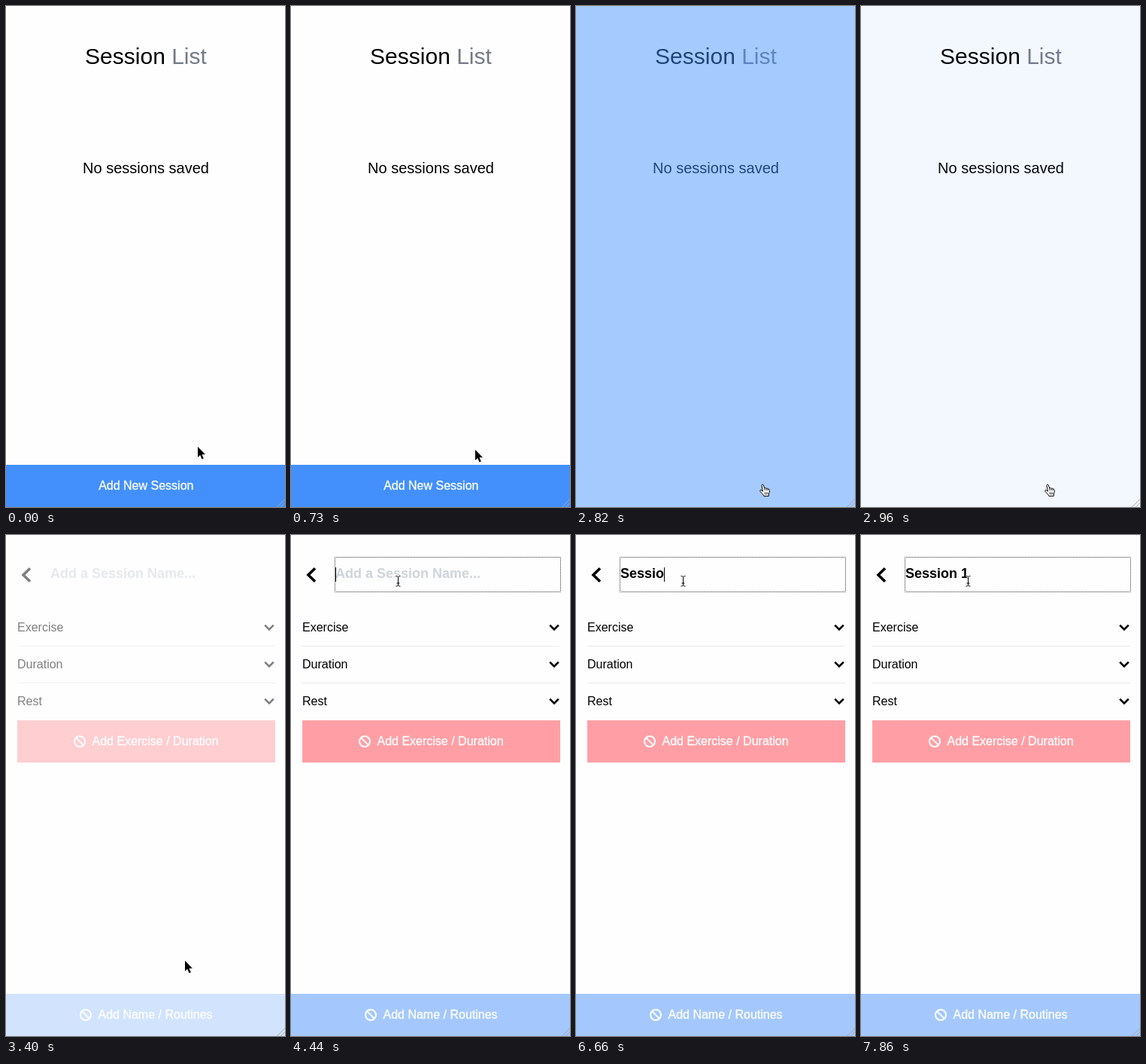
An HTML page that plays this animation: 371 px wide and 665 px high, repeating every 8000 ms.

```html
<!DOCTYPE html>
<html lang="en">
<head>
<meta charset="utf-8">
<title>Session list</title>
<style>
html, body { margin: 0; width: 100%; height: 100%; overflow: hidden; background: #fefefe; }
body { position: relative; font: 16px "Liberation Sans", Arial, sans-serif; }
svg { position: absolute; left: 0; top: 0; width: 371px; height: 665px; display: block; }
.mid { text-anchor: middle; }
.light { fill: #fff; stroke: #fff; stroke-width: .3px; }
.icon { fill: none; stroke: #fff; stroke-width: 2; }
.chevron { fill: none; stroke: #000; stroke-width: 2.6; }
.bold { font-weight: bold; font-size: 18px; }

/* every change is a hard step on one shared 8 s clock */
.list, .cta, .flash, .form, .focus, .hint, .typed::before, .caret,
.cursor, .arrow, .hand, .beam { animation: 8s step-end infinite; }

.list { animation-name: list; }
.cta { animation-name: cta; }
.flash { animation-name: flash; }
.form { animation-name: form; }
.focus { animation-name: focus; }
.hint { animation-name: hint; }
.caret { animation-name: caret; }
.cursor { animation-name: move; }
.arrow { animation-name: arrow; }
.hand { animation-name: hand; }
.beam { animation-name: beam; }

.field { position: absolute; left: 59px; top: 41px; line-height: 20px; white-space: pre; color: #000; }
.typed::before { content: ""; animation-name: type; }
.caret { display: inline-block; position: relative; width: 0; height: 0; }
.caret::after { content: ""; position: absolute; left: 0; top: -14px; width: 1px; height: 19px; background: #000; }

@keyframes list { 0% { opacity: 1 } 38.875% { opacity: .45 } 40.75%, 100% { opacity: 0 } }
@keyframes cta { 0% { opacity: 1 } 35.25%, 100% { opacity: 0 } }
@keyframes flash { 0% { opacity: 0 } 35.25% { opacity: .48 } 37% { opacity: .055 } 38.875%, 100% { opacity: 0 } }
@keyframes form { 0% { opacity: 0 } 40.75% { opacity: .5 } 42.625%, 100% { opacity: 1 } }
@keyframes focus { 0% { opacity: 0 } 55.5%, 100% { opacity: 1 } }
@keyframes hint { 0% { opacity: 1 } 72.25%, 100% { opacity: 0 } }
@keyframes caret {
  0% { opacity: 0 } 55.5% { opacity: 1 } 62.875% { opacity: 0 } 70.375% { opacity: 1 }
  90.75% { opacity: 0 } 94.5% { opacity: 1 } 98.25%, 100% { opacity: 0 }
}
@keyframes type {
  0% { content: "" } 72.25% { content: "S" } 76% { content: "Se" } 77.75% { content: "Ses" }
  79.625% { content: "Sess" } 81.5% { content: "Sessi" } 83.25% { content: "Sessio" }
  85.125% { content: "Session" } 94.5%, 100% { content: "Session 1" }
}
@keyframes move {
  0% { transform: translate(255px, 585px) }
  1.75% { transform: translate(251px, 578px) }
  3.625% { transform: translate(246px, 571px) }
  5.5% { transform: translate(243px, 569px) }
  7.25% { transform: translate(243px, 575px) }
  9.125% { transform: translate(245px, 589px) }
  11% { transform: translate(248px, 606px) }
  12.875% { transform: translate(250px, 622px) }
  14.625% { transform: translate(251px, 632px) }
  16.5% { transform: translate(250px, 634px) }
  20.25% { transform: translate(248px, 635px) }
  38.875% { transform: translate(246px, 622px) }
  40.75% { transform: translate(238px, 565px) }
  42.625% { transform: translate(222px, 440px) }
  44.375% { transform: translate(200px, 280px) }
  46.25% { transform: translate(176px, 145px) }
  48.125% { transform: translate(157px, 69px) }
  50% { transform: translate(147px, 63px) }
  51.75%, 100% { transform: translate(142px, 61px) }
}
@keyframes arrow { 0% { opacity: 1 } 12.875% { opacity: 0 } 38.875% { opacity: 1 } 48.125%, 100% { opacity: 0 } }
@keyframes hand { 0% { opacity: 0 } 12.875% { opacity: 1 } 38.875%, 100% { opacity: 0 } }
@keyframes beam { 0% { opacity: 0 } 48.125%, 100% { opacity: 1 } }
</style>
</head>
<body>
<svg viewBox="0 0 371 665">
  <defs>
    <path id="down" class="chevron" d="M344.2 119.7l5.8 5.8 5.8-5.8"/>
    <g id="ban" class="icon"><circle r="7"/><path d="M-4.9-4.9L4.9 4.9"/></g>
  </defs>

  <g class="list">
    <text class="mid" x="186" y="77" font-size="30">Session <tspan fill="#757a87">List</tspan></text>
    <text class="mid" x="186" y="222" font-size="20">No sessions saved</text>
    <g class="cta">
      <rect y="609" width="371" height="56" fill="#4390fc"/>
      <text class="mid light" x="186.3" y="642">Add New Session</text>
    </g>
  </g>
  <rect class="flash" width="371" height="665" fill="#4390fc"/>

  <g class="form">
    <path class="chevron" d="M32 44.2L23 53l9 8.8" style="stroke-width:3.6"/>
    <text class="hint bold" x="59" y="57" fill="#cfd4db">Add a Session Name...</text>
    <rect class="focus" x="58.5" y="29.5" width="300" height="46" fill="none" stroke="#333" stroke-dasharray="1 1" stroke-dashoffset=".5"/>
    <text x="15" y="128">Exercise</text>
    <text x="15" y="177">Duration</text>
    <text x="15" y="226">Rest</text>
    <use href="#down"/>
    <use href="#down" y="49"/>
    <use href="#down" y="98"/>
    <path d="M15 147.5H358M15 196.5H358" stroke="#e8e9eb"/>
    <rect x="15" y="246" width="343" height="56" fill="#ff9fa5"/>
    <use href="#ban" x="98" y="274"/>
    <text class="light" x="114.5" y="279">Add Exercise / Duration</text>
    <rect y="609" width="371" height="56" fill="#a4c8fd"/>
    <use href="#ban" x="106" y="637"/>
    <text class="light" x="122.5" y="642">Add Name / Routines</text>
  </g>
  <path d="M360.5 665L371 654.5M365.5 665l5.5-5.5" stroke="#a5a7ab" fill="none"/>
</svg>

<div class="field bold"><span class="typed"></span><span class="caret"></span></div>

<svg viewBox="0 0 371 665">
  <g class="cursor" stroke-linejoin="round">
    <path class="arrow" d="M0 0V14L3.2 11 5.5 16.4 7.8 15.4 5.5 10.2H10Z" stroke="#fff" stroke-width="1.6" paint-order="stroke"/>
    <g class="hand" transform="translate(-5 -1)" stroke="#000" fill="none">
      <path id="palm" d="M4 2.6C3.6.9 5.8.5 6.3 2L7.6 6.3C8 5.2 9.6 5.4 9.9 6.6 10.4 5.8 11.8 6 12 7.2 12.8 6.6 14 7.2 14.1 8.3 14.4 10.5 14.4 12 13.4 13.8L13.2 16.5H6.8C6.3 14.5 4 12.8 2.4 10.8.9 8.9 2.4 7.8 3.8 8.9L5.4 10.2Z" fill="#fff"/>
      <path d="M7.6 6.3L8.2 9M9.9 6.6L10.3 9M12 7.2L12.2 9.2M8.3 11.5V14.5M10.2 11.5V14.5M12 11.5V14.5" stroke-width=".8"/>
    </g>
    <g class="beam" fill="none">
      <path id="stem" d="M-2.5-6.5C-.5-6.5.5-6 .5-4.8V5.2C.5 6.5-.5 7-2.5 7M3.5-6.5C1.5-6.5.5-6 .5-4.8M.5 5.2C.5 6.5 1.5 7 3.5 7M-1.5 3H2.5" stroke="#fff" stroke-width="2.6"/>
      <path d="M-2.5-6.5C-.5-6.5.5-6 .5-4.8V5.2C.5 6.5-.5 7-2.5 7M3.5-6.5C1.5-6.5.5-6 .5-4.8M.5 5.2C.5 6.5 1.5 7 3.5 7M-1.5 3H2.5" stroke="#000"/>
    </g>
  </g>
</svg>
</body>
</html>
```
